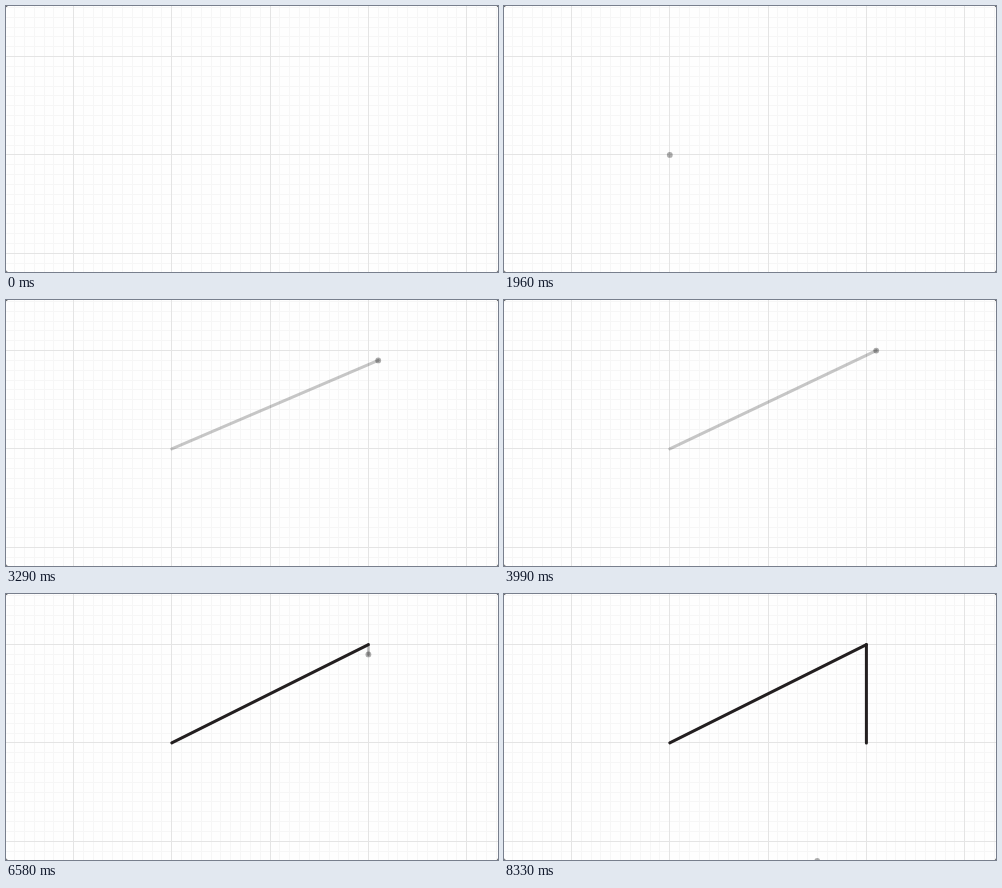
Recreate the animation shown at these times as an HTML page with a canvas. Size 492 by 266 pixels, loop 8890 ms.

```html
<!DOCTYPE html>
<html lang="en">
<head>
<meta charset="utf-8">
<title>Drawing lines on a grid</title>
<style>
  html, body { margin: 0; width: 100%; height: 100%; overflow: hidden; background: #555; }
  canvas { display: block; width: 492px; height: 266px; border-radius: 2.5px; background: #fefefe; }
</style>
</head>
<body>
<canvas id="stage" width="492" height="266"></canvas>
<script>
const W = 492, H = 266, LOOP = 8890, TICK = 70;
const CELL = 9.83, ORIGIN = { x: 165.8, y: 148.9 };
const ctx = document.getElementById('stage').getContext('2d');

const px = cx => ORIGIN.x + cx * CELL;
const py = cy => ORIGIN.y + cy * CELL;
const snap = v => Math.sign(v) * Math.round(Math.abs(v));

const glide = (from, to) => p => from.map((v, i) => v + (to[i] - v) * p);

// Most of a turn, from the left side through the bottom to the top.
const swirl = p => {
  const a = 1.45 * Math.PI * p;
  return [-5 - 4 * Math.cos(a), -2 + 3 * Math.sin(a)];
};

// Pointer moves in grid cells; each takes a number of ticks and snaps to the grid.
const moves = [];
function move(start, ticks, target) {
  const last = moves[moves.length - 1];
  const path = typeof target === 'function' ? target : glide(last ? last.path(1).map(snap) : target, target);
  moves.push({ start, ticks, path });
}
move(70, 1, [6, 11]);
move(1120, 1, [-9, -3]);
move(1330, 6, swirl);
move(1820, 3, [0, 0]);
move(2660, 4, [19, -8]);
move(3220, 2, [21, -9]);
move(3990, 2, [20, -10]);
move(4970, 3, [22, -7]);
move(5390, 2, [21, -9]);
move(5880, 2, [20, -10]);
move(6580, 5, [19, -3]);
move(7000, 1, [19, -2]);
move(7210, 3, [20, 0]);
move(8190, 3, [15, 12]);

const strokes = [
  { from: [0, 0], to: [20, -10], press: 2450, release: 4550 },
  { from: [20, -10], to: [20, 0], press: 6580, release: 7910 }
];

function pointerAt(t) {
  const m = moves.filter(m => m.start <= t).pop();
  if (!m) return null;
  const step = Math.min(Math.floor((t - m.start) / TICK) + 1, m.ticks);
  return m.path(step / m.ticks).map(snap);
}

function drawGrid() {
  for (const major of [false, true]) {
    ctx.fillStyle = major ? '#e4e4e4' : '#f6f6f6';
    for (let i = -20; i <= 40; i++) {
      if ((i % 10 === 0) !== major) continue;
      ctx.fillRect(Math.floor(px(i)), 0, 1, H);
      ctx.fillRect(0, Math.floor(py(i)), W, 1);
    }
  }
}

function drawLine(a, b, color) {
  ctx.strokeStyle = color;
  ctx.lineWidth = 3;
  ctx.lineCap = 'round';
  ctx.beginPath();
  ctx.moveTo(px(a[0]), py(a[1]));
  ctx.lineTo(px(b[0]), py(b[1]));
  ctx.stroke();
}

function drawDot([x, y]) {
  ctx.fillStyle = 'rgba(0, 0, 0, .32)';
  ctx.beginPath();
  ctx.arc(px(x), py(y), 2.9, 0, Math.PI * 2);
  ctx.fill();
}

function render(t) {
  const pointer = pointerAt(t);
  ctx.clearRect(0, 0, W, H);
  drawGrid();
  for (const s of strokes) {
    if (t >= s.press && t < s.release) drawLine(s.from, pointer, 'rgba(0, 0, 0, .22)');
  }
  for (const s of strokes) {
    if (t >= s.release) drawLine(s.from, s.to, '#231f20');
  }
  if (pointer) drawDot(pointer);
}

const begin = performance.now();
function loop() {
  render((performance.now() - begin) % LOOP);
  requestAnimationFrame(loop);
}
loop();
</script>
</body>
</html>
```
